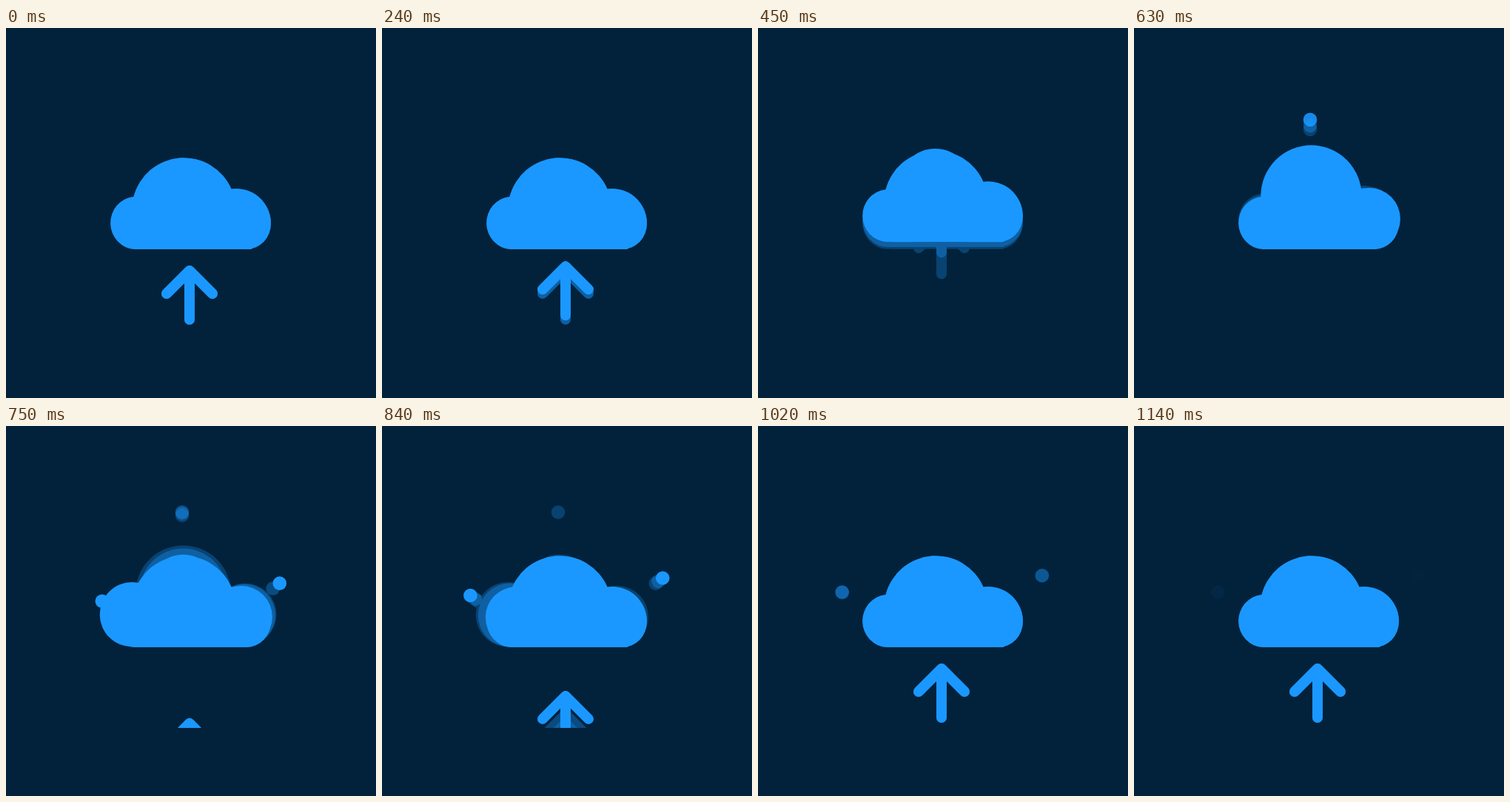
Recreate the animation shown at these times as an HTML page with a canvas. Size 500 by 500 pixels, loop 1170 ms.

```html
<!DOCTYPE html>
<html lang="en">
<head>
<meta charset="utf-8">
<title>Cloud upload</title>
<style>
html, body { margin: 0; width: 100%; height: 100%; overflow: hidden; background: #02223c; }
canvas { display: block; width: 100vw; height: 100vh; }
</style>
</head>
<body>
<canvas id="stage" width="500" height="500"></canvas>
<script>
const SIZE = 500, LOOP = 1170, STEP = 30;
const BG = '#02223c', BLUE = '#1a98ff';
const FLOOR = 299, MASK = 408;

const stage = document.getElementById('stage').getContext('2d');
const layer = document.createElement('canvas');
layer.width = layer.height = SIZE;
const ctx = layer.getContext('2d');
ctx.fillStyle = ctx.strokeStyle = BLUE;
ctx.lineWidth = 14;
ctx.lineCap = ctx.lineJoin = 'round';

// Delay in ms and opacity of each trail, oldest first
const TRAILS = [[90, 0.28], [60, 0.35], [0, 1]];

const BASE = new Path2D('M174 299A34.5 35.6 0 0 1 172.5 228A70 70 0 0 1 304.5 217.5' +
  'A47 47 0 0 1 358 264A33 35 0 0 1 325 299Z');
const ARROW = new Path2D('M217 359L248 328L279 359M248 328V394');

// Droplets: resting point, direction, launch time and fade span
const DROPS = [
  { x: 238, y: 116.5, dx: 0, dy: -1, at: 487, fade: [600, 860] },
  { x: 384, y: 202, dx: 0.8, dy: -0.6, at: 682, fade: [870, 1055] },
  { x: 113.5, y: 224.5, dx: -0.8, dy: -0.6, at: 697, fade: [890, 1080] }
];
const FLIGHT = 280, REACH = 31;

const clamp = p => Math.min(1, Math.max(0, p));
const mix = (a, b, p) => a + (b - a) * p;
const smooth = p => p * p * (3 - 2 * p);

// Eases 0 to 1 at the peak and back to 0
function swell(t, from, peak, to) {
  return smooth(clamp(t < peak ? (t - from) / (peak - from) : (to - t) / (to - peak)));
}

// Draws inside the area above a horizontal line, shifted by dy
function above(line, dy, paint) {
  ctx.save();
  ctx.beginPath();
  ctx.rect(0, 0, SIZE, line);
  ctx.clip();
  ctx.translate(0, dy);
  paint();
  ctx.restore();
}

function drawArrow(t) {
  if (t > 440 && t < 690) return;
  const y = t < 690 ? -5.8e-6 * Math.max(0, t - 140) ** 3 : Math.max(0, 0.41 * (930 - t));
  above(MASK, y, () => ctx.stroke(ARROW));
}

function drawDrop({ x, y, dx, dy, at, fade: [from, to] }, t) {
  if (t < at) return;
  const gap = REACH * (1 - clamp((t - at) / FLIGHT)) ** 2;
  ctx.globalAlpha = clamp((to - t) / (to - from));
  ctx.beginPath();
  ctx.arc(x - dx * gap, y - dy * gap, 9.3, 0, Math.PI * 2);
  ctx.fill();
  ctx.globalAlpha = 1;
}

function addCircle(path, x, y, r) {
  path.moveTo(x + r, y);
  path.arc(x, y, r, 0, Math.PI * 2);
}

function drawCloud(t) {
  const lift = -10 * swell(t, 350, 460, 600);
  const crown = swell(t, 390, 610, 790);
  const right = swell(t, 540, 690, 840);
  const left = swell(t, 630, 720, 980);
  const cloud = new Path2D(BASE);
  const r = mix(45, 69, crown);
  addCircle(cloud, 239.5, mix(176, 158, crown) + r, r);
  addCircle(cloud, mix(308, 323.3, right), mix(264, 254.8, right), 42);
  addCircle(cloud, mix(196, 169.5, left), mix(264, 254.3, left), mix(38, 44, left));
  above(FLOOR + lift, lift, () => ctx.fill(cloud));
}

function drawScene(t) {
  ctx.clearRect(0, 0, SIZE, SIZE);
  drawArrow(t);
  DROPS.forEach(drop => drawDrop(drop, t));
  drawCloud(t);
}

function draw(now) {
  const time = Math.floor((now % LOOP) / STEP) * STEP;
  stage.globalAlpha = 1;
  stage.fillStyle = BG;
  stage.fillRect(0, 0, SIZE, SIZE);
  for (const [delay, alpha] of TRAILS) {
    drawScene((time - delay + LOOP) % LOOP);
    stage.globalAlpha = alpha;
    stage.drawImage(layer, 0, 0);
  }
}

const start = performance.now();
function tick() {
  draw(performance.now() - start);
  requestAnimationFrame(tick);
}
tick();
</script>
</body>
</html>
```
